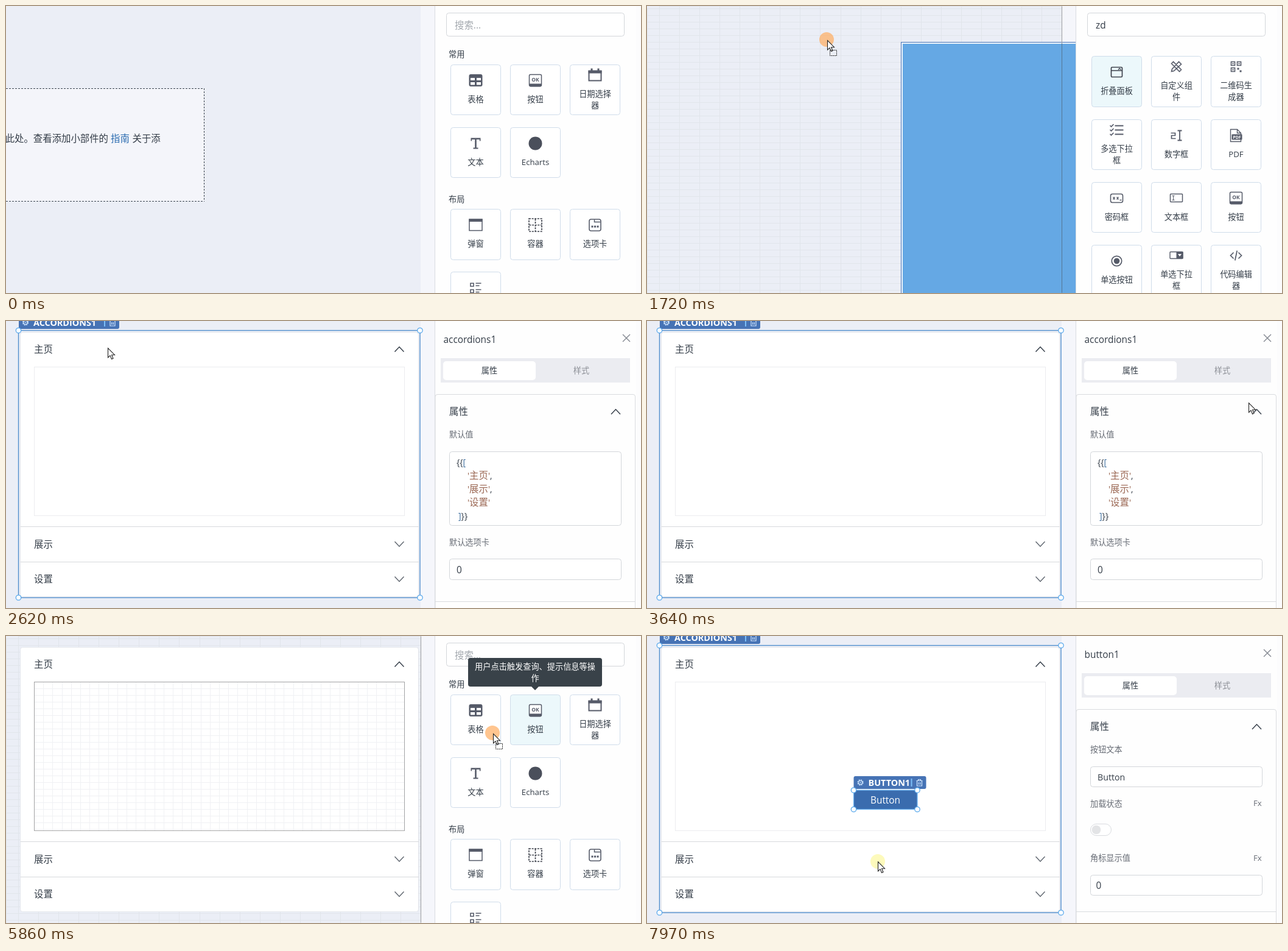
Recreate the animation shown at these times as an HTML page. Size 1043 by 471 pixels, loop 8000 ms.

```html
<!DOCTYPE html>
<html lang="zh">
<head>
<meta charset="utf-8">
<style>
  html, body { margin: 0; width: 100%; height: 100%; overflow: hidden; background: #fff; }
  svg { display: block; }
  text { font-family: 'Open Sans', 'Noto Sans CJK SC', 'Noto Sans CJK', sans-serif; white-space: pre; }
</style>
</head>
<body>
<svg id="stage" width="1043" height="471" viewBox="0 0 1043 471"></svg>
<script>
const LOOP = 8000;
const INK = '#333c47', ICON = '#565b69', MUTED = '#666b74';
const BIG = 15.4, SMALL = 13.2;
const COL = 33.06, ROW = 11, CELL = 15.2;

// --- drawing helpers ---
const text = (x, y, s, size = SMALL, fill = INK, extra = '') =>
  `<text x="${x}" y="${y}" font-size="${size}" fill="${fill}" ${extra}>${s}</text>`;
const mid = (x, y, s, size, fill, extra = '') => text(x, y, s, size, fill, `text-anchor="middle" ${extra}`);
const box = (x, y, w, h, fill, stroke = 'none', rx = 0, extra = '') =>
  `<rect x="${x}" y="${y}" width="${w}" height="${h}" rx="${rx}" fill="${fill}" stroke="${stroke}" ${extra}/>`;
const line = (d, stroke, w = 1, extra = '') =>
  `<path d="${d}" fill="none" stroke="${stroke}" stroke-width="${w}" ${extra}/>`;
const solid = (d, fill = ICON) => `<path d="${d}" fill="${fill}"/>`;
const dot = (x, y, r, fill, stroke = 'none', extra = '') =>
  `<circle cx="${x}" cy="${y}" r="${r}" fill="${fill}" stroke="${stroke}" ${extra}/>`;
const at = (x, y, s) => `<g transform="translate(${x} ${y})">${s}</g>`;
const field = (x, y, w, h) => box(x + .5, y + .5, w - 1, h - 1, '#fff', '#d3d6da', 4);
const chevron = (x, y, dir, color) => line(`M${x - 7.5} ${y - 4 * dir}l7.5 ${8 * dir}l7.5 ${-8 * dir}`, color, 1.4);

// --- icons, centred on 0,0 ---
const okFace = box(-10, -10, 20, 19, '#fff', ICON, 2, 'stroke-width="1.5"') + solid('M-10 5H10V8Q10 10 8 10H-8Q-10 10 -10 8Z');
const icons = {
  table: box(-11, -10.5, 22, 20, ICON, 'none', 3) + solid('M-8.5 -4.5h7v4h-7zM1.5 -4.5h7v4h-7zM-8.5 2.5h7V7h-7zM1.5 2.5h7V7h-7z', '#fff'),
  button: okFace + mid(0, 1.5, 'OK', 8.5, ICON, 'font-weight="700"'),
  date: line('M-10 -6.5H10V9H-10Z', ICON, 2) + solid('M-11 -8H11V-3H-11ZM-7 -11h3v4h-3zM4 -11h3v4H4z'),
  letter: solid('M-8 -9H8V-4H6.3V-6.5H1.3V7H4V9H-4V7H-1.3V-6.5H-6.3V-4H-8Z'),
  chart: dot(0, 0, 11, '#4a4f5b'),
  modal: box(-10.5, -9.5, 21, 18.5, '#fff', ICON, 0, 'stroke-width="1.5"') + solid('M-11 -10H11V-5.5H-11Z'),
  container: line('M-10.5 -10.5H10.5V10.5H-10.5ZM0 -10V10M-10 0H10', '#3f434d', 1.7, 'stroke-dasharray="3 1.6"'),
  tabs: box(-9.5, -9.5, 19, 19, '#fff', ICON, 3, 'stroke-width="1.6"') + line('M-1 -9V-5H9', ICON, 1.5) + solid('M-6 1h3v3h-3zM-1.5 1h3v3h-3zM3 1h3v3H3z'),
  list: line('M-8.5 -7.5h5v5h-5zM-8.5 3h5v5h-5z', ICON, 1.6) + line('M0 -7.5H9M0 -3.5H6M0 3H9M0 7H6', ICON, 1.6),
  panel: box(-9, -8, 18, 16, 'none', '#3f434d', 1.5, 'stroke-width="1.7"') + line('M-9 -2.5H9M2.5 -4L4.7 -6L7 -4', '#3f434d', 1.4),
  custom: line('M-8 -5L-5 -8L8 5L5 8ZM-8 8L-7 4L4 -8L8 -4L-4 7Z', ICON, 1.6),
  code2d: line('M-8 -8h6v6h-6zM2 -8h6v6H2zM-8 2h6v6h-6z', ICON, 1.6) + solid('M-6 -6h2v2h-2zM4 -6h2v2H4zM-6 4h2v2h-2zM2 2h3v3H2zM6 6h3v3H6z'),
  checks: line('M-3 -7H11M-3 0H11M-3 7H11', ICON, 2) + line('M-11 -7.5l2 2l4 -4M-11 -.5l2 2l4 -4M-11 6.5l2 2l4 -4', ICON, 1.6),
  number: line('M-9 -4H-2V0H-8V5H-1', ICON, 1.7) + line('M2 -8H9M2 8H9M5.5 -8V8', ICON, 1.8),
  pdf: line('M-9 -10H2L8 -4V10H-9ZM2 -10V-4H8', ICON, 1.4) + box(-7, -2, 17, 9, ICON, 'none', 1) + mid(1.5, 5, 'PDF', 6.8, '#fff', 'font-weight="700"'),
  password: box(-10, -7, 20, 14, 'none', ICON, 3, 'stroke-width="1.6"') + line('M-6 -2l3 4M-3 -2l-3 4M0 -2l3 4M3 -2l-3 4M5 3H8', ICON, 1.3),
  input: box(-10, -7, 20, 13, 'none', ICON, 1, 'stroke-width="1.5"') + line('M-7 -4h4M-7 3h4M-5 -4V3', ICON, 1),
  radio: dot(0, 0, 8.2, 'none', ICON, 'stroke-width="1.7"') + dot(0, 0, 4.8, ICON),
  select: box(-10.5, -6, 21, 11, 'none', ICON, 1, 'stroke-width="1.4"') + solid('M0 -6H11V5H0Z') + solid('M2.5 -2.5h6l-3 4z', '#fff'),
  code: line('M-4 -5L-9 0L-4 5M4 -5L9 0L4 5M1.7 -8L-1.7 8', ICON, 1.7),
};

const COMMON = [['table', '表格'], ['button', '按钮'], ['date', '日期选择', '器'], ['letter', '文本'], ['chart', 'Echarts']];
const LAYOUT = [['modal', '弹窗'], ['container', '容器'], ['tabs', '选项卡'], ['list', '列表']];
const FOUND = [
  ['panel', '折叠面板'], ['custom', '自定义组', '件'], ['code2d', '二维码生', '成器'],
  ['checks', '多选下拉', '框'], ['number', '数字框'], ['pdf', 'PDF'],
  ['password', '密码框'], ['input', '文本框'], ['button', '按钮'],
  ['radio', '单选按钮'], ['select', '单选下拉', '框'], ['code', '代码编辑', '器'],
];

const card = (x, top, [icon, a, b], hot) => {
  const y = Math.round(top), h = Math.round(top + 83.4) - y;
  return box(x + .5, y + .5, 82, h - 1, hot ? '#ecf8fb' : '#fff', '#cfdcea', 4) +
    at(x + 41.5, y + (b ? 17.5 : 26.5), icons[icon]) +
    mid(x + 41.5, y + (b ? 53 : 62), a) + (b ? mid(x + 41.5, y + 72, b) : '');
};
const cards = (list, top, hot) =>
  list.map((c, i) => card(730 + i % 3 * 98, top + Math.floor(i / 3) * 103.3, c, i === hot)).join('');

const search = typed => field(723, 11, 293, 39) +
  text(737, 36.5, typed || '搜索...', BIG, typed ? INK : '#a3a8ae');

const browser = (typed, hot) => search(typed) + text(727, 84, '常用') + cards(COMMON, 95.7, hot) +
  text(727, 322, '布局') + cards(LAYOUT, 333.15);

const tooltip = (cx, y, w, lines) => {
  const h = lines.length * 19 + 9;
  return box(cx - w / 2, y, w, h, '#394249', 'none', 4) +
    solid(`M${cx - 6} ${y + h}h12l-6 6z`, '#394249') +
    lines.map((s, i) => mid(cx, y + 19 + i * 19, s, SMALL, '#fff')).join('');
};

// --- property pane ---
const pane = (name, end) => text(718.5, 36, name, BIG) +
  line('M1013 22l12 12M1025 22l-12 12', '#858992', 1.4) +
  box(714, 61, 311, 40, '#ebecf1') + box(718, 66, 152, 31, '#fff', 'none', 5) +
  mid(794, 86, '属性') + mid(945, 86, '样式', SMALL, '#8d9097') +
  line(`M705 471V124Q705 120.5 709 120.5H1030Q1033.5 120.5 1033.5 124V471M705 ${end}.5H1033`, '#d9dbdf') +
  text(728, 154, '属性', BIG) + chevron(1001.5, 149, -1, INK);

const accordionPane = () => {
  const entry = (s, i) => text(758, 259 + i * 22,
    `'<tspan font-size="${BIG}">${s}</tspan>'<tspan fill="${INK}">${i < 2 ? ',' : ''}</tspan>`, 14, '#9a6652');
  return pane('accordions1', 460) + text(728, 191, '默认值', SMALL, MUTED) + field(728, 214, 283, 122) +
    text(740, 237, '{{<tspan fill="#3f6f9f">[</tspan>', 14) + ['主页', '展示', '设置'].map(entry).join('') +
    text(743, 325, '<tspan fill="#3f6f9f">]</tspan>}}', 14) +
    text(728, 368, '默认选项卡', SMALL, MUTED) + field(728, 390, 283, 35) + text(740, 414, '0', BIG);
};

const buttonPane = () => pane('button1', 452) +
  text(728, 191, '按钮文本', SMALL, MUTED) + field(728, 214, 283, 34) + text(740, 237, 'Button', 14.2) +
  text(728, 280, '加载状态', SMALL, MUTED) + text(996, 279, 'Fx', SMALL, MUTED) +
  box(728.5, 308.5, 34, 19, '#fff', '#d9dbdf', 9.5) + dot(738, 318, 7.3, '#e3e4e6') +
  text(728, 369, '角标显示值', SMALL, MUTED) + text(996, 369, 'Fx', SMALL, MUTED) +
  field(728, 392, 283, 34) + text(737.5, 415, '0', BIG);

// --- canvas ---
const grid = (x, y, w, h, dx, dy, color) => {
  let d = '';
  for (let i = x; i < x + w; i += dx) d += `M${Math.round(i) + .5} ${y}v${h}`;
  for (let j = y; j < y + h; j += dy) d += `M${x} ${Math.round(j) + .5}h${w}`;
  return line(d, color);
};
const outerGrid = () => grid(20, 0, 661, 471, COL, 999, '#e1e5eb') + grid(0, 4, 681, 467, 999, ROW, '#e1e5eb');

const emptyHint = () => box(0, 135, 326, 186, '#f4f5fa') +
  line('M0 135.5H326M325.5 135V321M0 320.5H326', '#3a4450', 1, 'stroke-dasharray="3 2"') +
  text(168, 223, '此处。查看添加小部件的', BIG, INK, 'text-anchor="end"') +
  text(172, 223, '指南', BIG, '#2b6cb0') + text(207.5, 223, '关于添', BIG);

const accordion = inner => box(23.5, 18.5, 654, 434, '#fff', '#e3e6ec', 4) +
  text(46, 52, '主页', BIG) + chevron(646, 46.5, -1, INK) +
  (inner ? grid(46, 75, 609, 245, CELL, ROW, '#f0f1f4') : '') +
  box(46.5, 75.5, 608, 244, 'none', inner ? '#555' : '#ebecef', 0, inner ? 'stroke-dasharray="1 1"' : '') +
  line('M24 337.5H678M24 395.5H678', '#d7d9dc') +
  text(46, 372, '展示', BIG) + chevron(646, 366, 1, '#5f666f') +
  text(46, 429, '设置', BIG) + chevron(646, 423.5, 1, '#5f666f');

const frame = (x, y, w, h, color) => box(x, y, w, h, 'none', color, 0, 'stroke-width="1.3"') +
  [[0, 0], [w, 0], [0, h], [w, h]].map(([a, b]) => dot(x + a, y + b, 4.2, '#fff', '#5aa9ec', 'stroke-width="1.3"')).join('');

const badge = (x, y, w, name) => {
  const gear = dot(0, 0, 4, 'none', '#cfe6ff', 'stroke-width="2" stroke-dasharray="2 1.14"') + dot(0, 0, 3, 'none', '#cfe6ff') + dot(0, 0, 1, '#cfe6ff');
  const bin = line('M-5 -3.5H5M-2 -3.5V-5.5H2V-3.5M-4 -3.5V5H4V-3.5M-1.3 -1V3M1.3 -1V3', '#cfe6ff', 1.2);
  return box(x, y, w, 21, '#4673b5', 'none', 3) + at(x + 11, y + 10.5, gear) +
    text(x + 24, y + 15.5, name, 14.4, '#fff', 'font-weight="700"') +
    line(`M${x + w - 24} ${y + 4}v13`, '#7cc0f8', 2) + at(x + w - 11, y + 11, bin);
};

const accordionFrame = () => badge(21, -8, 165, 'ACCORDIONS1') + frame(20.5, 15.5, 659.5, 438.5, '#4a8acb');
const placedButton = () => badge(339.5, 230, 119, 'BUTTON1') + box(340, 253, 104, 31, '#3a6cae', 'none', 2) +
  mid(391.5, 275, 'Button', BIG, '#fff') + frame(339.5, 253, 104.5, 31.5, '#6fb5f2');

const panelGhost = (x, y) => box(x + .5, y + .5, 661, 439, '#eef4fb', '#4272b8') + box(x + 3, y + 3, 656, 434, '#65a8e4');
const buttonGhost = (x, y) => {
  let d = `M${x} ${y + 13.5}h93`;
  for (let i = 1; i < 6; i++) d += `M${Math.round(x + i * CELL) + .5} ${y}v27`;
  return box(x - 2.5, y - 2.5, 98, 32, '#fff', '#4a8fd6') + box(x, y, 93, 27, '#89bae7') + line(d, '#62a5e2');
};

// --- pointer ---
const PATH = [
  [700, 815, 60], [900, 790, 112], [1210, 771, 123], [1510, 627, 95], [1810, 130, 36], [2110, 89, 26],
  [2310, 48, 24], [2420, 60, 26], [2520, 100, 34], [2620, 167, 44], [2920, 420, 80], [3220, 684, 90],
  [3620, 988, 134], [3920, 860, 15], [4120, 684, 39], [4320, 660, 20], [4720, 636, 4], [4960, 636, 4],
  [5660, 871, 136], [5860, 800, 160], [6260, 367, 273], [6360, 367, 273], [6560, 549, 236],
  [6660, 560, 232], [7460, 632, 200], [7860, 379, 370], [LOOP, 379, 370],
];
function pointerAt(t) {
  const i = Math.max(1, PATH.findIndex(k => k[0] >= t));
  const [t0, x0, y0] = PATH[i - 1], [t1, x1, y1] = PATH[i];
  const k = Math.max(0, (t - t0) / (t1 - t0));
  return [x0 + (x1 - x0) * k, y0 + (y1 - y0) * k];
}
const snap = (v, origin, step, lo, hi) =>
  Math.round(origin + step * Math.min(hi, Math.max(lo, Math.round((v - origin) / step))));

function pointer(t, dragging) {
  if (t < 700) return '';
  const [x, y] = pointerAt(t).map(Math.round);
  const arrow = '<path d="M.5 .5V16L4 12.6L6.5 18.5L9 17.5L6.6 11.7H11.5Z" fill="#fff" stroke="#222" stroke-width="1.1"/>';
  return (dragging ? dot(x - 1, y - 1, 12, '#ffaa5a', 'none', 'opacity=".68"') : '') +
    (t >= 7860 ? dot(x, y, 12, '#fdfabc') : '') +
    at(x, y, arrow + (dragging ? box(4.5, 16.5, 11, 9, 'none', '#222', 0, 'stroke-dasharray="2 1"') : ''));
}

// --- scene ---
function scene(t) {
  const during = (a, b) => t >= a && t < b;
  const firstDrag = during(1210, 2520), secondDrag = during(5760, 6660);
  const dragging = firstDrag || during(5760, 6360);
  const edge = line('M681.5 0V471', '#444', 1, 'stroke-dasharray="1 1" stroke-dashoffset="1"');
  const [gx, gy] = pointerAt(Math.min(t - 100, 6360));

  let left = box(0, 0, 681, 471, '#ebeef6') + box(681, 0, 23, 471, '#f5f6fb');
  if (firstDrag || secondDrag) left += outerGrid();
  if (t < 1210) left += emptyHint();
  if (during(1310, 2520)) left += panelGhost(snap(gx - 35, 20, COL, 0, 20), snap(gy - 12, 15, ROW, 0, 20));
  if (t >= 2520) left += accordion(during(5860, 6660));
  if (during(2520, 4960) || t >= 6660) left += accordionFrame();
  if (during(6060, 6660)) left += buttonGhost(snap(gx - 46, 47, CELL, 0, 33), snap(gy - 13, 260, ROW, -16, 2));
  if (t >= 6660) left += placedButton();
  if (firstDrag || secondDrag) left += edge;

  let right = box(704, 0, 339, 471, '#fefefe') + box(1035, 0, 8, 471, '#fcfcfd') + line('M704.5 0V471', '#d9dce1');
  if (t < 500) right += browser(t < 300 ? '' : 'z');
  else if (t < 2520) right += search(t < 600 ? 'z' : 'zd') + cards(FOUND, 82.4, t >= 900 ? 0 : -1);
  else if (t < 4960) right += accordionPane();
  else if (t < 6660) right += browser('', t >= 5560 ? 1 : -1);
  else right += buttonPane();

  if (during(1910, 2520)) right += tooltip(772, 41, 112, ['可以折叠的组件']);
  if (during(5860, 6660)) right += tooltip(869, 36, 220, ['用户点击触发查询、提示信息等操', '作']);
  return `<clipPath id="canvas"><rect width="704" height="471"/></clipPath><g clip-path="url(#canvas)">${left}</g>` +
    right + pointer(t, dragging);
}

// The screen advances in 100 ms ticks with a few short rests.
function tick(t) {
  if (t >= 900 && t < 1110) return 900;
  if (t >= 2320 && t < 2520) return 2310;
  if (t >= 4740 && t < 4960) return 4720;
  const start = [4960, 2520, 1110, 0].find(s => t >= s);
  return start + Math.floor((t - start) / 100) * 100;
}

const stage = document.getElementById('stage');
const born = performance.now();
let shown = -1;
function play() {
  const t = tick((performance.now() - born) % LOOP);
  if (t !== shown) stage.innerHTML = scene(shown = t);
  requestAnimationFrame(play);
}
play();
</script>
</body>
</html>
```
